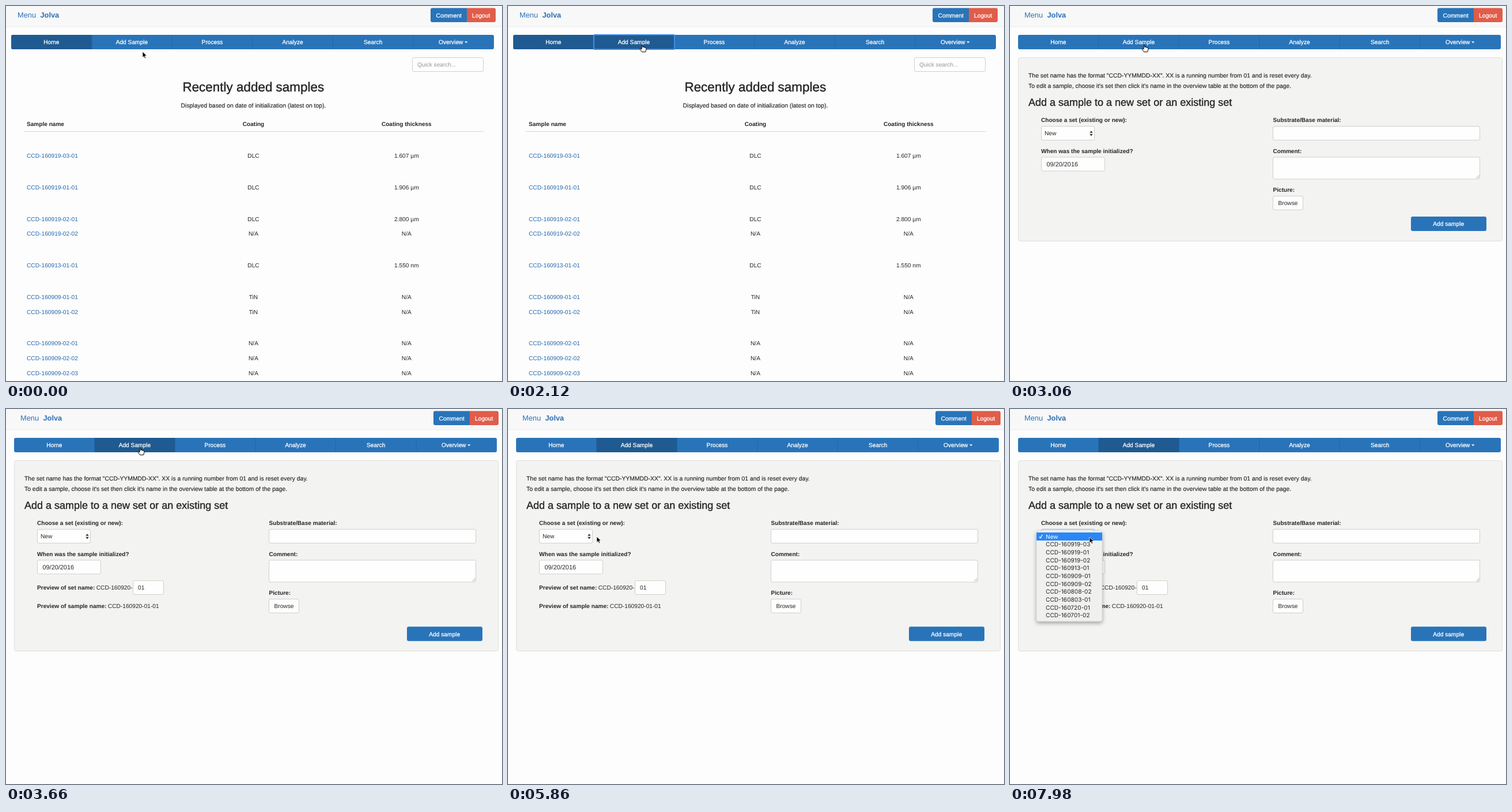
Write an HTML page that moves like this. It is 861 px wide and 650 px high and loops after 8 s.

```html
<!DOCTYPE html>
<html lang="en">
<head>
<meta charset="utf-8">
<title>Sample database</title>
<style>
  html, body { margin: 0; width: 100%; height: 100%; overflow: hidden; background: #fdfdfd; }
  svg { display: block; width: 100vw; height: 100vh; }
  text {
    font-family: "Liberation Sans", Arial, sans-serif;
    font-size: 10.2px; fill: #262626; white-space: pre;
    text-rendering: geometricPrecision;
  }
  .bold { font-weight: 700; font-size: 10.08px; }
  .link { fill: #2468ae; }
  .brand { font-size: 12.8px; fill: #2a70b8; }
  .note { font-size: 10.4px; stroke: #262626; stroke-width: .15px; }
  .h2 { font-size: 22.45px; stroke: #262626; stroke-width: .45px; }
  .h3 { font-size: 18px; stroke: #262626; stroke-width: .4px; }
  .light { fill: #fff; stroke: #fff; stroke-width: .28px; }
  .hint { fill: #959595; font-size: 10.1px; }
  .date { font-size: 10.9px; }
  .menu { font-family: Inter, "Liberation Sans", sans-serif; font-size: 10.15px; }
  .field { fill: #fefefe; stroke: #cfcfcb; }
</style>
</head>
<body>
<svg id="stage" viewBox="0 0 861 650" xmlns="http://www.w3.org/2000/svg">
  <defs>
    <filter id="shadow" x="-20%" y="-20%" width="140%" height="150%">
      <feDropShadow dx="0" dy="3" stdDeviation="3.5" flood-color="#000" flood-opacity=".35"/>
    </filter>
    <filter id="glow" x="-10%" y="-30%" width="120%" height="160%">
      <feGaussianBlur stdDeviation=".6"/>
    </filter>
  </defs>
</svg>
<script>
const LOOP = 8000;
const PRESS = 2000, LOAD = 2980, READY = 3400, OPEN = 6760, RING = 7000;
const BLUE = '#2974b9', DARK = '#1f5a91';
const stage = document.getElementById('stage');

function add(parent, tag, attrs, content) {
  const el = document.createElementNS('http://www.w3.org/2000/svg', tag);
  for (const key in attrs) el.setAttribute(key, attrs[key]);
  if (content) el.textContent = content;
  parent.appendChild(el);
  return el;
}
const group = parent => add(parent, 'g', {});
const rect = (parent, x, y, width, height, attrs) =>
  add(parent, 'rect', { x, y, width, height, ...attrs });
const path = (parent, d, attrs) => add(parent, 'path', { d, ...attrs });
const text = (parent, x, y, content, cls = '', anchor = 'start') =>
  add(parent, 'text', { x, y, class: cls, 'text-anchor': anchor }, content);
const field = (parent, x, y, w, h) =>
  rect(parent, x + .5, y + .5, w - 1, h - 1, { rx: 2.5, class: 'field' });
const show = (el, on) => el.setAttribute('display', on ? 'inline' : 'none');

rect(stage, 0, 0, 861, 650, { fill: '#fdfdfd' });
rect(stage, 0, 0, 861, 36, { fill: '#f8f8f8' });
rect(stage, 0, 35.5, 861, 1, { fill: '#ededed' });

// Header and navigation
const top_ = group(stage);
text(top_, 20, 19.5, 'Menu', 'brand');
text(top_, 59.5, 19.5, 'Jolva', 'brand').setAttribute('font-weight', 700);
path(top_, 'M740 3.5H800V28H740a3 3 0 0 1-3-3V6.5a3 3 0 0 1 3-3Z', { fill: BLUE });
path(top_, 'M800 3.5H847a3 3 0 0 1 3 3V25a3 3 0 0 1-3 3H800Z', { fill: '#e05d4a' });
text(top_, 768.7, 19.5, 'Comment', 'light', 'middle');
text(top_, 824.7, 19.5, 'Logout', 'light', 'middle');

const TAB = 139.6;
rect(top_, 9, 50, 838, 25, { rx: 3, fill: BLUE });
const homeTab = path(top_, 'M12 50H149.5V75H12a3 3 0 0 1-3-3V53a3 3 0 0 1 3-3Z', { fill: DARK });
const addTab = rect(top_, 149, 50, 140, 25, { fill: DARK });
for (let i = 1; i < 6; i++) rect(top_, 8.5 + i * TAB, 50, 1, 25, { fill: '#2467a6' });
const focusRing = rect(top_, 149, 50, 140, 25, {
  fill: 'none', stroke: '#3f8ae6', 'stroke-width': 2.2, rx: 1.5, filter: 'url(#glow)'
});
['Home', 'Add Sample', 'Process', 'Analyze', 'Search'].forEach((name, i) =>
  text(top_, 9 + (i + .5) * TAB, 66, name, 'light', 'middle'));
text(top_, 751, 66, 'Overview', 'light');
path(top_, 'M796 61.5h5.5l-2.75 2.8Z', { fill: '#fff' });

// Sample list
const home = group(stage);
field(home, 705, 89, 124, 25);
text(home, 714, 105, 'Quick search...', 'hint');
text(home, 429.3, 147.7, 'Recently added samples', 'h2', 'middle');
text(home, 429.5, 175.5, 'Displayed based on date of initialization (latest on top).', 'note', 'middle');
text(home, 36, 208, 'Sample name', 'bold');
text(home, 429.5, 208, 'Coating', 'bold', 'middle');
text(home, 695.3, 208, 'Coating thickness', 'bold', 'middle');
rect(home, 31, 217, 798, 1, { fill: '#d6d6cc' });
[
  [263.2, '160919-03-01', 'DLC', '1.607 µm'],
  [318, '160919-01-01', 'DLC', '1.906 µm'],
  [372.6, '160919-02-01', 'DLC', '2.800 µm'],
  [398.4, '160919-02-02', 'N/A', 'N/A'],
  [453.2, '160913-01-01', 'DLC', '1.550 nm'],
  [507.8, '160909-01-01', 'TiN', 'N/A'],
  [533.6, '160909-01-02', 'TiN', 'N/A'],
  [588.2, '160909-02-01', 'N/A', 'N/A'],
  [614, '160909-02-02', 'N/A', 'N/A'],
  [639.8, '160909-02-03', 'N/A', 'N/A']
].forEach(([y, id, coating, depth]) => {
  text(home, 36, y, 'CCD-' + id, 'link');
  text(home, 429.5, y, coating, '', 'middle');
  text(home, 695.3, y, depth, '', 'middle');
});

// Form
const form = group(stage);
const panel = rect(form, 14.5, 89.5, 840, 318, { rx: 3, fill: '#f3f3f2', stroke: '#dededc' });
text(form, 32, 123.6, 'The set name has the format "CCD-YYMMDD-XX". XX is a running number from 01 and is reset every day.', 'note');
text(form, 32, 141.6, "To edit a sample, choose it's set then click it's name in the overview table at the bottom of the page.", 'note');
text(form, 32, 173.4, 'Add a sample to a new set or an existing set', 'h3');

text(form, 54, 201.4, 'Choose a set (existing or new):', 'bold');
const select = field(form, 54, 208, 93, 25);
text(form, 60, 224.4, 'New');
path(form, 'M138.3 219.8l2.7-3.6 2.7 3.6ZM138.3 221.8l2.7 3.6 2.7-3.6Z', { fill: '#333' });
text(form, 54, 254.6, 'When was the sample initialized?', 'bold');
field(form, 54, 261.5, 111, 25);
text(form, 63.5, 277.6, '09/20/2016', 'date');

text(form, 456.5, 201.4, 'Substrate/Base material:', 'bold');
field(form, 456, 208, 360, 25);
text(form, 456.5, 254.6, 'Comment:', 'bold');
field(form, 456, 261.5, 360, 39);
path(form, 'M809.5 298.5l5-5M812.5 298.5l2-2', { stroke: '#888', 'stroke-width': .8 });
text(form, 456.5, 322.2, 'Picture:', 'bold');
field(form, 456, 329, 53, 25);
text(form, 482.5, 345.3, 'Browse', '', 'middle');

const submit = group(form);
rect(submit, 696, 365, 131, 25, { rx: 3, fill: BLUE });
text(submit, 761.2, 381.4, 'Add sample', 'light', 'middle');

const preview = group(form);
text(preview, 54, 313, 'Preview of set name:', 'bold');
text(preview, 156.7, 313, 'CCD-160920-');
field(preview, 220, 297, 54, 25);
text(preview, 229, 313, '01');
text(preview, 54, 345.2, 'Preview of sample name:', 'bold');
text(preview, 176.8, 345.2, 'CCD-160920-01-01');

const menu = group(form);
rect(menu, 46, 211, 114, 157, { rx: 3.5, fill: '#f0f0ef', stroke: '#c4c4c4', 'stroke-width': .5, filter: 'url(#shadow)' });
rect(menu, 46, 214, 114, 14, { fill: '#2a87f8' });
path(menu, 'M50.8 221.3l2 2.6 3.4-6.2', { fill: 'none', stroke: '#fff', 'stroke-width': 1.3 });
['New', '160919-03', '160919-01', '160919-02', '160913-01', '160909-01', '160909-02',
  '160808-02', '160803-01', '160720-01', '160701-02'].forEach((id, i) => {
  const row = text(menu, 62, 224.7 + i * 13.65, i ? 'CCD-' + id : id, 'menu');
  if (!i) row.style.fill = '#fff';
});

// Pointers, both drawn from their hot spot
const arrow = path(stage, 'M0 0V10.4L2.4 8.2 4 11.8 5.8 11 4.2 7.5H7.4Z',
  { fill: '#000', stroke: '#fff', 'stroke-width': .8, 'stroke-linejoin': 'round' });
const hand = path(stage,
  'M-.9 .8Q0-.4 .9 .8V4.6Q2-.0 3 4.9Q4.2 4 5 5.3Q6.6 4.7 6.9 6.4V8.6L5.7 12.6H-.6L-3.6 8.2Q-4 6.6-2.6 6.7L-.9 8Z',
  { fill: '#fff', stroke: '#000', 'stroke-width': 1, 'stroke-linejoin': 'round' });

// Pointer stops: time, x, y
const stops = [
  [0, 237, 79], [1660, 237, 79], [1900, 233, 67], [4240, 233, 67],
  [4700, 219.5, 86], [4900, 219.5, 86], [5600, 154, 221],
  [6100, 154, 221], [6500, 138, 222], [LOOP, 138, 222]
];
function pointerAt(t) {
  const i = stops.findIndex(s => s[0] > t);
  const [t0, x0, y0] = stops[i - 1], [t1, x1, y1] = stops[i];
  const p = (t - t0) / (t1 - t0), e = p * p * (3 - 2 * p);
  return [x0 + (x1 - x0) * e, y0 + (y1 - y0) * e];
}

function render(t) {
  const loaded = t >= LOAD, ready = t >= READY;
  const [x, y] = pointerAt(t);
  const overTab = y < 75;

  top_.setAttribute('transform', `translate(${loaded ? 5 : 0} 0)`);
  show(home, !loaded);
  show(form, loaded);
  show(homeTab, !loaded);
  show(addTab, loaded ? ready : overTab);
  show(focusRing, !loaded && t >= PRESS);

  panel.setAttribute('height', ready ? 330 : 318);
  submit.setAttribute('transform', `translate(0 ${ready ? 12.3 : 0})`);
  show(preview, ready);
  show(menu, t >= OPEN);
  select.style.stroke = t >= RING ? '#7db4ea' : '';

  show(arrow, !overTab);
  show(hand, overTab);
  (overTab ? hand : arrow).setAttribute('transform', `translate(${x} ${y})`);
}

function tick() {
  render(performance.now() % LOOP);
  requestAnimationFrame(tick);
}
tick();
</script>
</body>
</html>
```
